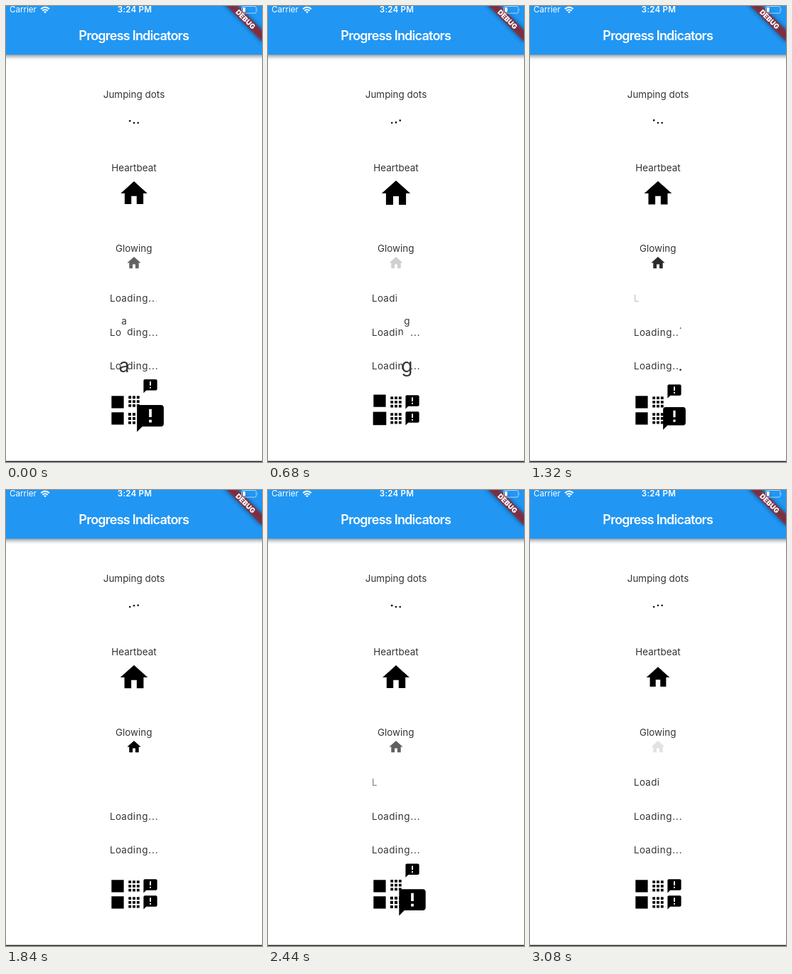
An HTML page for the animation above (3.16 s loop, 360x640 px).

```html
<!DOCTYPE html>
<html lang="en">
<head>
<meta charset="utf-8">
<title>Progress Indicators</title>
<style>
  html, body { margin: 0; width: 100%; height: 100%; overflow: hidden; background: #fff; }
  svg { display: block; width: 360px; height: 640px; font-family: Inter, Roboto, sans-serif; }
  text { text-anchor: middle; }
  .label, .letter { font-size: 13.44px; fill: #343434; }
  .bar { filter: drop-shadow(0 3px 2.5px rgba(0, 0, 0, .36)); }
  .status { font-size: 11.6px; fill: #fff; }
</style>
</head>
<body>
<svg viewBox="0 0 360 640">
  <rect width="360" height="640" fill="#fff"/>
  <rect class="bar" x="-20" y="-20" width="400" height="88.5" fill="#2196f3"/>
  <text x="179.7" y="48.3" font-size="18" font-weight="600" letter-spacing="-.77" fill="#fff">Progress Indicators</text>

  <g transform="translate(360 -4.3) rotate(45)">
    <rect x="-38.4" y="26.9" width="76.8" height="11.5" opacity=".5" style="filter: blur(3.4px)"/>
    <rect x="-38.4" y="26.9" width="76.8" height="11.5" fill="#b71c1c" fill-opacity=".63"/>
    <text y="36.2" font-size="9.8" font-weight="900" fill="#fff">DEBUG</text>
  </g>

  <text class="status" x="5" y="9.4" style="text-anchor: start">Carrier</text>
  <text class="status" x="181" y="9.4" font-weight="600" letter-spacing=".2">3:24 PM</text>
  <g fill="none" stroke="#fff" stroke-width="2.1">
    <path d="M49.2 4.2a8.2 8.2 0 0 1 11.6 0M51.4 6.7a5.1 5.1 0 0 1 7.2 0"/>
    <path d="M53.2 8.3a2.5 2.5 0 0 1 3.6 0L55 10.2z" fill="#fff" stroke="none"/>
  </g>
  <rect x="331.5" y=".5" width="20.5" height="9.6" rx="2.2" fill="none" stroke="#fff" stroke-opacity=".6"/>
  <rect x="333" y="2" width="3.6" height="6.6" rx=".8" fill="#fff"/>
  <path d="M353.5 3.6q1.4 1.7 0 3.4z" fill="#fff" fill-opacity=".6"/>

  <text class="label" x="180" y="129.3">Jumping dots</text>
  <text class="label" x="180" y="232.2">Heartbeat</text>
  <text class="label" x="179.7" y="345.1">Glowing</text>
  <g id="stage"></g>
  <rect y="638.6" width="360" height="1.4" fill="#222"/>
</svg>
<script>
const NS = 'http://www.w3.org/2000/svg';
const UNIT = 0.96; // stage pixels per layout point
const SECOND = 1225; // playback ms per second of interface time
const FRAME = 40, LAST = 3080, LOOP = 3160;
const stage = document.getElementById('stage');

const HOME = 'M10 20v-6h4v6h5v-8h3L12 3 2 12h3v8z';
const BUBBLE = 'M20 2H4c-1.1 0-1.99.9-1.99 2L2 22l4-4h14c1.1 0 2-.9 2-2V4c0-1.1-.9-2-2-2zm-7 9h-2V5h2v6zm0 4h-2v-2h2v2z';
const SQUARE = 'M3 3h18v18H3z';
const APPS = [4, 10, 16].flatMap(y => [4, 10, 16].map(x => `M${x} ${y}h4v4h-4z`)).join('');

const clamp = v => Math.max(0, Math.min(1, v));
const mod = (a, n) => ((a % n) + n) % n;

function bezier(x1, y1, x2, y2) {
  const at = (a, b, s) => 3 * a * s * (1 - s) ** 2 + 3 * b * s * s * (1 - s) + s ** 3;
  return x => {
    if (x <= 0) return 0;
    if (x >= 1) return 1;
    let lo = 0, hi = 1;
    for (let i = 0; i < 24; i++) {
      const mid = (lo + hi) / 2;
      if (at(x1, x2, mid) < x) lo = mid; else hi = mid;
    }
    return at(y1, y2, lo);
  };
}
const ease = bezier(.25, .1, .25, 1);
const easeOut = bezier(0, 0, .58, 1);
const easeInOut = bezier(.42, 0, .58, 1);
const elasticOut = u => u <= 0 ? 0 : u >= 1 ? 1
  : 1 + 2 ** (-10 * u) * Math.sin((u - .1) * 5 * Math.PI);

function add(parent, tag, attrs, text) {
  const el = parent.appendChild(document.createElementNS(NS, tag));
  for (const key in attrs) el.setAttribute(key, attrs[key]);
  if (text) el.textContent = text;
  return el;
}

function place(item, dy = 0, scale = 1) {
  item.el.setAttribute('transform', `translate(${item.x} ${item.y + dy}) scale(${scale})`);
}

function icon(path, x, y) {
  const item = { el: add(stage, 'g'), x, y };
  add(item.el, 'path', { d: path, transform: `scale(${UNIT}) translate(-12 -12)` });
  place(item);
  return item;
}

// Each letter sits in its own cell, rounded up to whole points.
function letterRow(y) {
  const widths = [8, 9, 8, 9, 4, 9, 9, 5, 5, 5];
  let left = (375 - 71) / 2;
  return [...'Loading...'].map((char, i) => {
    const item = { el: add(stage, 'g'), x: (left + widths[i] / 2) * UNIT, y };
    add(item.el, 'text', { class: 'letter', y: 3.8 }, char);
    left += widths[i];
    place(item);
    return item;
  });
}

const iconRow = y => [SQUARE, APPS, BUBBLE].map((path, i) => icon(path, 157 + 23 * i, y));

const dots = [0, 1, 2].map(i =>
  add(stage, 'circle', { cx: 174.2 + 5.76 * i, r: 1.3, fill: '#111' }));
const heart = icon(HOME, 180, 263);
const glow = icon(HOME, 180, 360.6);
const fading = letterRow(411.6);
const jumping = letterRow(459);
const scaling = letterRow(506.4);
const slideIcons = iconRow(555.9);
const scaleIcons = iconRow(578.9);

// Back-and-forth progress with a short rest at the turning point.
function pingPong(t, trough, period, duration, rest = 0) {
  const x = mod(t - trough, period);
  return clamp((Math.min(x, period - x) - rest) / duration);
}

// Wave through a row: item i rises during its step and falls during the next.
function wave(t, i, count, duration) {
  const step = duration / (2 * count);
  const u = mod(t + 563, duration) / step - i;
  return u <= 1 ? ease(u) : 1 - ease(u - 1);
}

function draw(t) {
  dots.forEach((dot, i) => {
    const x = mod(t + 200, 1250) - 315 * i;
    dot.setAttribute('cy', 164 - 4 * clamp(Math.min(x, 610 - x) / 300));
  });

  const beat = pingPong(t, 530, 2455, 1200, 14);
  place(heart, 0, 1 + elasticOut(beat));
  glow.el.setAttribute('opacity', easeOut(beat));

  const fade = pingPong(t, 1866, 4 * SECOND, 2 * SECOND);
  fading.forEach((item, i) =>
    item.el.setAttribute('opacity', easeInOut((fade - .2 - .06 * i) / .06)));

  jumping.forEach((item, i) => place(item, -17 * UNIT * wave(t, i, 10, 3 * SECOND)));
  scaling.forEach((item, i) => place(item, 0, 1 + wave(t, i, 10, 3 * SECOND)));
  slideIcons.forEach((item, i) => place(item, -24 * UNIT * wave(t, i, 3, SECOND)));
  scaleIcons.forEach((item, i) => place(item, 0, 1 + wave(t, i, 3, SECOND)));
}

const start = performance.now();
function tick() {
  const t = (performance.now() - start) % LOOP;
  draw(Math.min(LAST, Math.floor(t / FRAME) * FRAME));
  requestAnimationFrame(tick);
}
tick();
</script>
</body>
</html>
```
